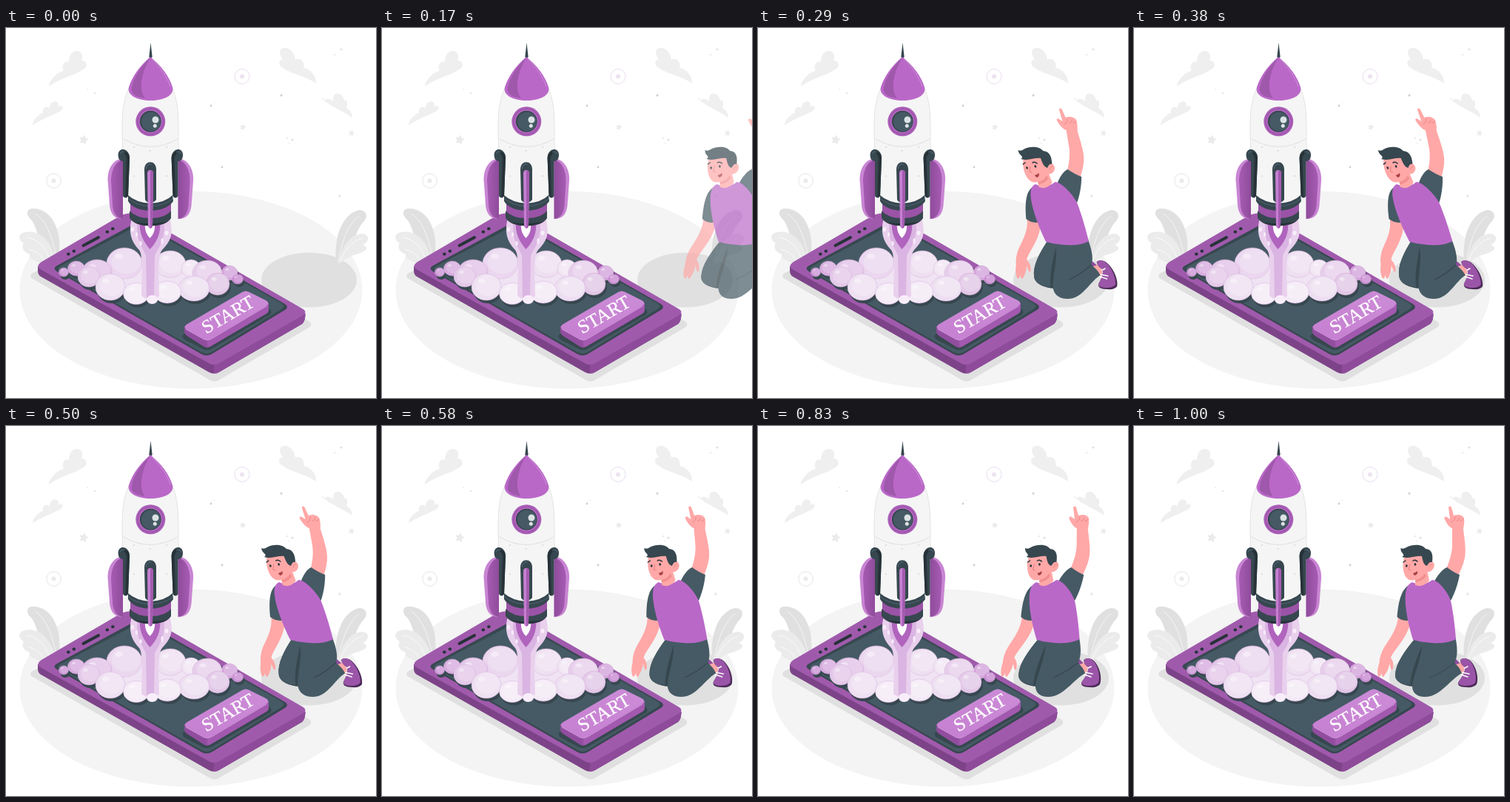
Recreate the animation shown at these times as an HTML page. Size 500x500 px, loop 1.04 s.

```html
<!DOCTYPE html>
<html lang="en">
<head>
<meta charset="utf-8">
<title>Rocket launch</title>
<style>
  html, body { margin: 0; width: 100%; height: 100%; overflow: hidden; background: #fff; }
  svg { display: block; width: 100vw; height: 100vh; }
  .start { font: 25.5px "Liberation Serif", "Noto Serif", serif; fill: #fff; stroke: #fff; stroke-width: .35; text-anchor: middle; }
  .line { fill: none; stroke-linecap: round; stroke-linejoin: round; }
</style>
</head>
<body>
<svg viewBox="0 0 500 500">
  <defs>
    <linearGradient id="finShade"><stop offset="0" stop-color="#a65bb3"/><stop offset="1" stop-color="#8f4c9b"/></linearGradient>
    <linearGradient id="slab" x1="0" y1="1" x2="1" y2="0"><stop offset="0" stop-color="#c67fd1"/><stop offset="1" stop-color="#cc8cd7"/></linearGradient>
    <g id="sideFin">
      <path d="M158 177C146 176 137 190 137.500 205L140 239C141 251 146 258 158 258Z" fill="#c885d3"/>
      <path d="M158 178C148 180 142 192 142 207L144 240C145 250 149 257 158 258Z" fill="url(#finShade)"/>
      <path d="M151.500 172C151.500 163 160 162 164 167Q167 170 167 176L165 227Q161 232 158 227V180Q152 180 151.500 172Z" fill="#37474f"/>
      <path d="M163 168Q167 170 167 176L165 227Q163 230 161.500 229L163 176Q162 170 157 168Q160 165 163 168Z" fill="#263238"/>
      <path d="M154 170Q156 166 160 168" class="line" stroke="#546e7a"/>
    </g>
  </defs>

  <ellipse cx="250" cy="354" rx="231.500" ry="133.500" fill="#f4f4f4"/>
  <ellipse cx="409.500" cy="340.500" rx="64.500" ry="37" fill="#e0e0e0"/>
  <g id="sky"></g>

  <g id="plants">
    <path d="M72 303C75 276 63 244 37 244C27 244 27 252 33 258C42 266 44 292 57 310Z" fill="#e0e0e0"/>
    <path d="M40 251C54 260 62 281 67 305" class="line" stroke="#f5f5f5"/>
    <path d="M66 308C58 284 43 272 25 276C15 279 17 287 24 291C20 297 24 303 32 306C29 311 38 315 48 318Z" fill="#ebebeb"/>
    <path d="M28 283C42 285 53 295 58 310M31 299Q43 301 51 313" class="line" stroke="#fafafa"/>
    <path d="M446 316C443 281 455 251 477 246C488 246 489 255 484 261C473 271 470 295 452 318Z" fill="#e0e0e0"/>
    <path d="M477 254C462 265 454 288 449 316" class="line" stroke="#f5f5f5"/>
    <path d="M449 319C454 292 467 278 482 278C492 280 491 289 482 293C492 297 486 302 476 305C465 308 459 312 449 319Z" fill="#ebebeb"/>
    <path d="M482 284C466 288 457 301 452 315" class="line" stroke="#fafafa"/>
  </g>

  <g id="phone">
    <path d="M36 331Q30 335 36 339L276 476Q283 480 289 475L409 405Q416 400 409 396L390 385L60 320Z" fill="#e0e0e0"/>
    <path d="M43 322V329Q43 334 49 337L274 465Q281 469 288 465L400 400Q404.500 396 404.500 386Z" fill="#7d4388"/>
    <path d="M281 452V467Q285 467 288 465L400 400Q404.500 396 404.500 386Z" fill="#8e4b9a"/>
    <path d="M48 316Q39 322 48 327L274 453Q281 457 288 453L400 389Q409 384 400 379L195 261Q174 244 154 254Z" fill="#a05aac"/>
    <path d="M69 321Q62 325 69 329L263 440Q271 445 279 440L377 381Q383 377 377 373L180 261Z" fill="#37474f"/>
    <path d="M73 322Q67 326 73 329L264 438Q271 442 278 438L372 380Q379 376 372 372L182 265Z" fill="#455a64"/>
    <g class="line" stroke="#263238" stroke-width="4">
      <path d="M104.500 294L125 283"/>
      <path d="M84 305.500h.6M91.500 301.500h.6M136.500 275.500h.6M144 271.300h.6"/>
    </g>
  </g>

  <g id="button">
    <path d="M242 412Q235 417 243 422L266 434Q272 437 279 433L356 388Q361 384 356 379Z" fill="#37474f"/>
    <path d="M241.500 403V412Q242 414 245 416L267 430Q272 433 277 430L352 386Q355 384 355 381V372Z" fill="#a259af"/>
    <path d="M241.500 403V412Q242 414 245 416L267 430Q270 432 272 432V422Z" fill="#914d9e"/>
    <path d="M245 400Q238 404 245 408L267 420Q272 423 277 420L351 376Q358 372 351 368L329 357Q324 354 319 357Z" fill="url(#slab)"/>
    <path d="M243 407L267 420.500Q272 423 277 420.500L352 376" class="line" stroke="#d9a5e1" stroke-width=".8"/>
    <text class="start" transform="translate(304 394.500) rotate(-30)">START</text>
  </g>

  <g id="smoke"></g>

  <g id="flame">
    <path d="M170 257C164 280 172 291 180 300C185 307 184 330 183 362Q195 371 207 362C206 330 205 307 211 300C221 289 228 280 221 257Z" fill="#e9d0ed"/>
    <path d="M178 258C174 283 184 296 189 307L190 364H200L201 307C207 296 217 283 213 258Z" fill="#dab4e2"/>
    <path d="M181 260C179 278 187 290 194.500 299C203 290 210 278 208 260Z" fill="#b064bd"/>
    <path d="M188 262C187 274 190 279 194.500 284C199 279 202 274 201 262Z" fill="#fff"/>
    <g fill="#f8eefa">
      <ellipse cx="171" cy="272" rx="2" ry="3"/><ellipse cx="176.500" cy="279" rx="1.500" ry="3"/>
      <ellipse cx="217" cy="277" rx="2.500" ry="3"/><ellipse cx="182" cy="291" rx="1.500" ry="3"/>
      <ellipse cx="211" cy="288" rx="1.500" ry="4"/><ellipse cx="197.500" cy="367" rx="7.500" ry="6"/>
    </g>
  </g>

  <g id="rocket">
    <path d="M168 235V256Q172 267 195 267Q219 267 223 256V235Z" fill="#9b53a7"/>
    <path d="M167 247Q176 257 195 257Q215 257 223 247V257Q216 267 195 267.500Q174 267 167 257Z" fill="#37474f"/>
    <path d="M173 262Q181 267 195 267Q211 267 219 261Q212 264 195 264Q181 264 173 262Z" fill="#263238"/>
    <path d="M167 79C158 98 157 113 157 140L158 178L166 231Q195 247 225 231L233 178V140C233 113 232 98 224 79Z" fill="#f5f5f5" stroke="#dedede" stroke-width=".8"/>
    <path d="M159 150Q195 171 232 150" class="line" stroke="#e0e0e0"/>
    <g fill="#d4d4d4"><circle cx="173" cy="161" r="1"/><circle cx="195" cy="166" r="1"/><circle cx="217" cy="161" r="1"/><circle cx="173" cy="200" r="1"/><circle cx="217" cy="200" r="1"/></g>
    <path d="M165 226Q176 236 195 237Q215 236 225 226L226 234Q218 246 195 247Q172 246 165 234Z" fill="#37474f"/>
    <path d="M166 231Q176 240 195 241Q215 240 225 231" class="line" stroke="#546e7a" stroke-width=".8"/>
    <path d="M195.500 20L193.300 39Q195 43 197.700 39Z" fill="#37474f"/>
    <path d="M195 39C181 51 170 66 166 80C163 91 178 98 195 98C213 98 228 91 225 80C221 66 210 51 195 39Z" fill="#ba68c8"/>
    <path d="M195 40C181 53 173 67 170 80C168 88 174 93 188 95C178 82 184 58 195 40Z" fill="#9f58ab"/>
    <path d="M198 43C209 53 218 66 222 79" class="line" stroke="#cb8fd6"/>
    <circle cx="195.300" cy="126.300" r="20" fill="#ad61bb"/>
    <circle cx="195.300" cy="126.300" r="18" fill="#9c55a8"/>
    <circle cx="195.300" cy="126.300" r="16.200" fill="#ba68c8"/>
    <circle cx="195.300" cy="126.300" r="14.500" fill="#37474f"/>
    <circle cx="196" cy="126.500" r="13" fill="#455a64"/>
    <circle cx="202" cy="124" r="4.500" fill="#dce3e6"/><circle cx="201.300" cy="132.200" r="2.500" fill="#dce3e6"/>
    <use href="#sideFin"/><use href="#sideFin" transform="matrix(-1 0 0 1 390.600 0)"/>
    <path d="M187 191C187 178 203 178 203 191V232Q200 236 195 236Q190 236 188 232Z" fill="#37474f"/>
    <path d="M189 190Q191 183 196 184" class="line" stroke="#546e7a"/>
    <path d="M191 197Q191 192 195 192Q199 192 199 197L198 268Q195 274 192 268Z" fill="#c57fd0"/>
    <path d="M195 192Q199 192 199 197L198 268Q197 271 195 271Z" fill="#a45bb0"/>
  </g>

  <g id="man">
    <path d="M427 322C425 315 430 312 435 315L443 323L438 332Z" fill="#8f4d9c"/>
    <path d="M432 323L442 320Q449 328 444 335L438 335Z" fill="#ffa8a7"/>
    <path d="M441 316C446 312 453 314 457 320C463 328 466 341 463 349Q459 354 449 353C440 353 436 350 439 345C444 338 448 332 447 326Q441 322 441 316Z" fill="#4b2a58"/>
    <path d="M441 316C446 312 452 314 456 320C461 328 463.500 340 461 347Q457 351 449 351C441 351 437 349 439 345C444 338 448 332 447 326Q441 322 441 316Z" fill="#9b55a8"/>
    <path d="M442 336L451 339M443 333L453 335M447 327L451 325" class="line" stroke="#fff" stroke-width="1.400"/>

    <path d="M380 287C366 304 354 320 353 336C352 346 365 351 377 352L405 305Z" fill="#37474f"/>
    <path d="M380 287C366 304 354 320 353 336C353 345 362 349 373 350C374 334 382 314 390 294Z" fill="#455a64"/>
    <path d="M378 285L434 284C438 302 437 313 433 320Q440 326 443 334C430 341 416 361 401 365C388 368 377 364 376 353C376 340 388 317 389 297Z" fill="#455a64"/>
    <path d="M400 340C414 334 423 328 433 320" class="line" stroke="#37474f"/>

    <path d="M357 257C356 272 348 284 342 293C335 303 332 312 331.500 320C329 327 328.500 334 330 338C332 340 334 336 335 333C334 339 337 341 339 336C342 332 344 328 345.500 321C347 327 347 331 349.500 329C351.500 323 350.500 318 347 313C352 301 372 284 375 259Z" fill="#ffa8a7"/>
    <path d="M372 215C361 220 357 239 355.500 258Q363 265 374 262L378 225Z" fill="#455a64"/>
    <path d="M425 110C427 107 429 109 429.500 112L432 121C437 119 445 120 446 125C447 132 445 136 445 140C447 155 449 168 447 178C445 188 441 196 437 204L421 195C427 182 430 170 430 160V138C426 137 422 131 419.500 125C419 122 422 122 424 124L427 126Z" fill="#ffa8a7"/>
    <path d="M429 130Q434 128 434 123M436 128Q439 129 440 124M441 128Q444 129 445 126" class="line" stroke="#e5817f" stroke-width=".8"/>
    <path d="M423 191Q432 198 440 201C438 213 433 227 428 236L405 211C411 201 416 194 423 191Z" fill="#455a64"/>
    <path d="M376 211C386 216 395 214 403 208C411 208 424 224 428 236C432 255 434 274 435 288C418 297 393 293 377 289C371 270 365 243 367 226C368 218 371 213 376 211Z" fill="#ba68c8"/>

    <path d="M380 200L396 194L399 209Q390 219 380 215Z" fill="#ffa8a7"/>
    <path d="M380 208Q389 206 393 199L395 203Q388 211 380 211Z" fill="#f28f8f"/>
    <path d="M366 175C361 189 364 204 372 208C381 210 391 204 394 197C403 199 408 190 405 185C402 181 398 184 396 187L390 172Z" fill="#ffa8a7"/>
    <path d="M360.500 165Q364 167 368 164C378 159 390 160 394 166C404 167 404 176 403 184Q399 183 396 189C391 188 390 181 389 176C380 175 373 180 362 177Q366 175 363 172Q360 169 360.500 165Z" fill="#37474f"/>
    <path d="M364 184L367 182M377 182Q380 180 383 183" class="line" stroke="#263238" stroke-width="1.500"/>
    <ellipse cx="368.300" cy="189" rx="1.400" ry="1.700" fill="#263238"/><ellipse cx="380" cy="187" rx="1.400" ry="1.700" fill="#263238"/>
    <path d="M373 187L371 194L374 195" class="line" stroke="#e5817f"/>
    <path d="M377 199Q381 198 383 196Q384 201 379 202Z" fill="#a83f48"/>
    <path d="M399 191Q400 187 403 187" class="line" stroke="#e5817f" stroke-width=".8"/>
  </g>
</svg>
<script>
const LOOP = 1040, FPS = 24;
const byId = id => document.getElementById(id);
const ellipse = (x, y, rx, ry, fill, extra = "") =>
  `<ellipse cx="${x}" cy="${y}" rx="${rx}" ry="${ry}" fill="${fill}" ${extra}/>`;
const path = (d, fill) => `<path d="${d}" fill="${fill}"/>`;

function star(x, y, r) {
  const points = Array.from({ length: 10 }, (_, i) => {
    const a = i * Math.PI / 5 - 1.35, d = i % 2 ? r * .5 : r;
    return [x + d * Math.cos(a), y + d * Math.sin(a)].map(v => v.toFixed(1));
  });
  return `<polygon points="${points.join(" ")}" fill="#ebebeb"/>`;
}

const ring = (x, y, r, color) =>
  `<circle cx="${x}" cy="${y}" r="${r}" fill="none" stroke="${color}" stroke-width=".9"/>` +
  ellipse(x, y, 3, 3, color, 'opacity=".7"');

const clouds = [
  "M58 79C58 72 69 59 78 58C74 50 80 43 85 46C85 33 94 28 100 32Q105 36 102 44C109 43 111 51 106 55C92 65 78 65 58 79Z",
  "M36 131C36 125 44 116 50 115C48 108 55 104 59 109C59 100 66 97 70 101Q72 104 70 107C77 102 79 109 74 112C64 118 54 120 36 131Z",
  "M419 75C420 66 412 55 402 54C405 45 396 39 391 43C390 30 378 23 371 29Q368 35 374 42C367 43 368 51 374 54C387 63 403 64 419 75Z",
  "M468 121Q468 112 460 108C463 101 460 96 457 98C456 89 448 87 444 90Q441 93 443 99C435 94 432 95 432 98L426 93C430 102 450 109 468 121Z"
];
const dots = [
  [277, 105, 1.4, "#ccc"], [281, 100, .6, "#ccc"], [372, 91, 1.5, "#ccc"], [292, 188, 1.4, "#ccc"],
  [453, 29, 1.5, "#e0e0e0"], [444, 36, .9, "#e0e0e0"], [120, 88, 1.6, "#ebebeb"], [110, 83, .9, "#ebebeb"],
  [387, 151, 1.5, "#e0e0e0"], [380, 149, 1, "#e0e0e0"], [382, 156, .8, "#e0e0e0"], [451, 227, 2, "#ebebeb"]
];
byId("sky").innerHTML =
  clouds.map(d => path(d, "#efefef")).join("") +
  dots.map(([x, y, r, c]) => ellipse(x, y, r, r, c)).join("") +
  star(105, 151, 7) + star(320, 134, 4.5) + star(467, 142, 4.5) +
  ring(319, 65.5, 10, "#e6d8ea") + ring(64.5, 206.5, 9.8, "#e4dfe6");

// x, y, rx, ry, color
const puffs = [
  [160, 318, 24, 21, "#ebd7ef"], [222, 319, 21, 18, "#eedff1"], [250, 325, 13, 12, "#f2e6f4"],
  [78, 330, 6.5, 6, "#cd97d7"], [95, 325, 11.5, 10, "#d8acdf"], [123, 329, 20, 16, "#e2c4e8"],
  [112, 336, 15, 14, "#e4c9e9"], [302, 331, 11, 10, "#d4a4dc"], [313, 339.5, 7.5, 6.5, "#c88bd3"],
  [272, 331, 20, 17, "#e7cfeb"], [286, 346, 16, 15, "#e2c7e7"], [141, 350, 20, 18, "#eee0f1"],
  [254, 352, 21, 17, "#eddff1"], [176, 359, 17.5, 14.5, "#f5ecf7"], [218, 357, 18.5, 15, "#f4eaf6"]
];
byId("smoke").innerHTML =
  puffs.map(([x, y, rx, ry]) => ellipse(x + 2, y + 4, rx, ry, "#37474f")).join("") +
  path("M125 330L160 310L235 312L285 330L270 355L197 366L140 350Z", "#f0e3f3") +
  puffs.map(([x, y, rx, ry, c]) =>
    ellipse(x, y, rx, ry, c, 'stroke="#d8b3df" stroke-width=".5"') +
    ellipse(x + rx * .1, y - ry * .12, rx * .82, ry * .8, "#fff", 'opacity=".2"') +
    ellipse(x - rx * .3, y - ry * .45, rx * .22, ry * .16, "#fff", 'opacity=".4"')).join("");

function bezier(u, x1, y1, x2, y2) {
  const at = (s, a, b) => 3 * a * s * (1 - s) ** 2 + 3 * b * s * s * (1 - s) + s ** 3;
  let low = 0, high = 1;
  for (let i = 0; i < 24; i++) {
    const mid = (low + high) / 2;
    if (at(mid, x1, x2) < u) low = mid; else high = mid;
  }
  return at(low, y1, y2);
}
const ease = u => bezier(u, .36, -.01, .5, 1.38);
const mix = (a, b, p) => a + (b - a) * p;

// The loop opens with the entrance already under way
const LEAD = 140, ENTRANCE = 1080, CENTER_Y = 237;
const keys = [
  { at: 0, shift: 250, skew: -20, opacity: 0 },
  { at: .6, shift: 0, skew: 10, opacity: 1 },
  { at: .8, shift: 0, skew: -2, opacity: 1 },
  { at: 1, shift: 0, skew: 0, opacity: 1 }
];

function draw(t) {
  const q = Math.min(1, (t + LEAD) / ENTRANCE);
  const next = keys.findIndex(k => k.at >= q);
  const a = keys[next - 1], b = keys[next];
  const p = ease((q - a.at) / (b.at - a.at));
  const slope = Math.tan(mix(a.skew, b.skew, p) * Math.PI / 180);
  const man = byId("man");
  man.setAttribute("transform", `matrix(1 0 ${slope} 1 ${mix(a.shift, b.shift, p) - CENTER_Y * slope} 0)`);
  man.setAttribute("opacity", Math.min(1, mix(a.opacity, b.opacity, p)));
}

const start = performance.now();
function tick() {
  const t = (performance.now() - start) % LOOP;
  const step = Math.min(24, Math.floor((t + 4) * FPS / 1000));
  draw(step * 1000 / FPS);
  requestAnimationFrame(tick);
}
tick();
</script>
</body>
</html>
```
